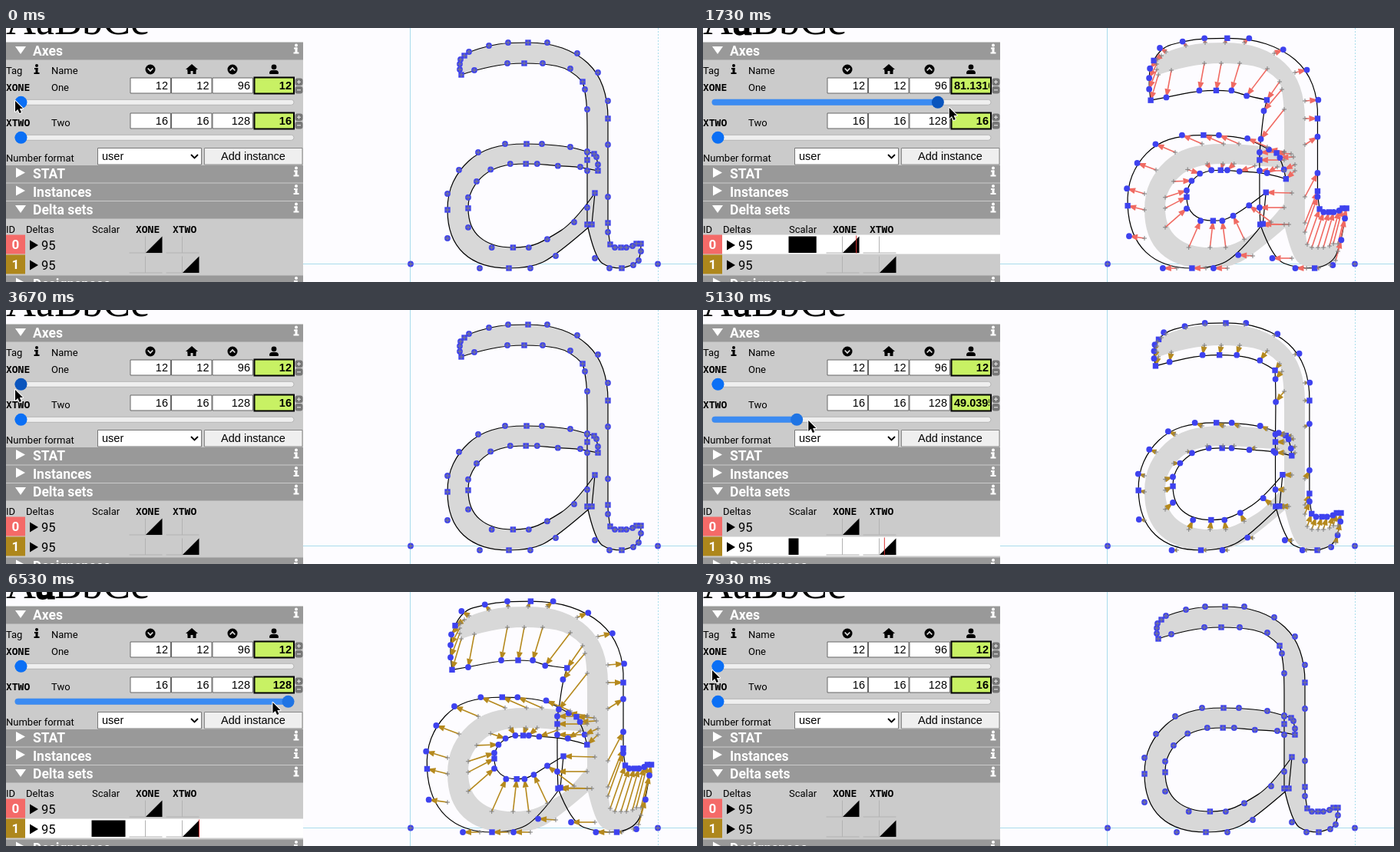
These frames come from a looping animation (900x331 px, 8 s). An HTML page with a canvas:

```html
<!DOCTYPE html>
<html lang="en">
<head>
<meta charset="utf-8">
<title>Variable font axes</title>
<style>
  html, body { margin: 0; height: 100%; overflow: hidden; background: #fdfcff; }
  canvas { display: block; }
</style>
</head>
<body>
<canvas id="stage" width="900" height="331"></canvas>
<script>
const ctx = document.getElementById('stage').getContext('2d');
const LOOP = 8000, STEP = 1000 / 15;
const SANS = 'Roboto, sans-serif', MONO = '"Noto Sans Mono", monospace', ARIAL = '"Liberation Sans", Arial, sans-serif';
const LABEL = `13px ${SANS}`, TAG = `bold 13px ${MONO}`, FIELD = `14.5px ${ARIAL}`, TITLE = '54px "Liberation Serif", serif';
const RED = '#f06a62', GOLD = '#b5891d', BLUE = '#3e42ef', LINE = '#b2b2b2', GUIDE = '#a9dcec';

// Motion: smooth ramps, and pulses that rise and fall back.
function ramp(t, from, to) {
  const u = Math.min(1, Math.max(0, (t - from) / (to - from)));
  return u * u * (3 - 2 * u);
}
const pulse = (t, rise, top, fall, end) => ramp(t, rise, top) - ramp(t, fall, end);

// Glyph: key points ("*" marks on-curve ones) and, per part, a rule for how the points move.
const withDelta = (p, rule) => {
  const [dx, dy] = rule(p.x, p.y);
  return { ...p, dx, dy };
};
const part = (keys, rule) => keys.split(' ').map(key => {
  const [x, y] = key.split(',').map(parseFloat);
  return withDelta({ x, y, on: key.endsWith('*') }, rule);
});

const stem = [
  part('593,61* 591,54 591,47 592,41 597,36*', (x, y) => [-12, 1.3 * (y - 30)]),
  part('603,31 629,23 654,19 680,19* 705,19 744,33 771,58 784,95', (x, y) => [.17 * (x - 660), .07 * (y - 118)]),
  part('784,118* 784,152 784,220 784,254*', (x, y) => [20, .37 * (118 - y)]),
  part('784,266 787,282* 793,286 801,286* 808,286 816,284 821,281* 827,281*', x => [20 - .15 * (x - 784), -56]),
  part('827,291 824,303 817,309 802,313* 786,313 767,300 757,256*',
    x => [.7 * (x - 757) - 38, Math.min(0, 6.5 * (819 - x))]),
  part('757,234 757,186 757,172* 757,162', () => [-39, 0]),
  part('757,106 754,80 751,70*', (x, y) => [2.8 * (757 - x) - 37, 47 - .5 * (106 - y)]),
  part('735,53 699,46 675,46* 653,46 610,55', x => [-8 - .55 * Math.max(0, x - 690), 43])
].flat();

// The counter is the outer bowl scaled down, walked backwards.
const counterRule = (x, y) => [34 - .5 * (x - 602), 10 - .48 * (y - 177)];
const outerBowl = part(
  '716,297 683,313 655,313* 617,313 575,274 575,237* 575,216 590,185 615,162 650,151 678,151* 698,151 735,155',
  (x, y) => [-22 - .06 * (313 - y), -.086 * (313 - y)]);
const counter = outerBowl.map(({ x, y, on }) =>
  withDelta({ x: 602 + .73 * (x - 575), y: 177 + .673 * (y - 151), on }, counterRule)).reverse();
const bowl = [
  part('767,215* 763,256*', () => [-41, -1]),
  outerBowl,
  part('757,161 766,164* 769,168 771,178 771,186* 748,181', (x, y) => [.4 * (y - 164) - 23, .65 * (y - 166)]),
  counter,
  part('740,253', counterRule)
].flat();
const contours = [stem, bowl], points = contours.flat();

function box(x, y, w, h, fill, stroke, width = 1, radius = 0) {
  ctx.beginPath();
  ctx.roundRect(x, y, w, h, radius);
  if (fill) { ctx.fillStyle = fill; ctx.fill(); }
  if (stroke) { ctx.strokeStyle = stroke; ctx.lineWidth = width; ctx.stroke(); }
}
function text(s, x, y, font, fill = '#000', align = 'left') {
  ctx.font = font;
  ctx.fillStyle = fill;
  ctx.textAlign = align;
  ctx.fillText(s, x, y);
}
function trace(xy) {
  ctx.beginPath();
  for (let i = 0; i < xy.length; i += 2) ctx.lineTo(xy[i], xy[i + 1]);
}
function poly(fill, ...xy) {
  trace(xy);
  ctx.fillStyle = fill;
  ctx.fill();
}
function line(color, width, ...xy) {
  trace(xy);
  ctx.strokeStyle = color;
  ctx.lineWidth = width;
  ctx.stroke();
}
function disc(x, y, r, fill) {
  ctx.beginPath();
  ctx.arc(x, y, r, 0, 7);
  ctx.fillStyle = fill;
  ctx.fill();
}

function info(x, y, fill) {
  disc(x, y - 5, 2, fill);
  box(x - 3, y - 2, 4.5, 2, fill);
  box(x - 1.5, y - 2, 3, 7, fill);
  box(x - 3.5, y + 4, 7, 2, fill);
}
function header(label, y, open) {
  box(0, y, 387, 22.5, '#999');
  if (open) poly('#fff', 12, y + 5, 26, y + 5, 19, y + 15);
  else poly('#fff', 13, y + 3, 25, y + 9.5, 13, y + 16);
  text(label, 35, y + 17, `600 17.5px ${SANS}`, '#fff');
  info(378, y + 8.5, '#fff');
}
function columnIcons() {
  for (const [x, s] of [[188, 1], [295, -1]]) {
    disc(x, 54, 6.5, '#000');
    line('#ddd', 1.8, x - 3.3, 54 - 1.5 * s, x, 54 + 2 * s, x + 3.3, 54 - 1.5 * s);
  }
  poly('#000', 234, 54, 242, 47, 250, 54);
  box(236.5, 53, 4, 7, '#000');
  box(243.5, 53, 4, 7, '#000');
  box(236.5, 53, 11, 3, '#000');
  disc(349, 50.8, 3.4, '#000');
  box(343, 55, 12, 5, '#000', null, 1, [4, 4, 1, 1]);
}

function axisRow(tag, name, y, min, max, v, thumb) {
  text(tag, 0, y + 17, TAG);
  text(name, 59, y + 17, LABEL);
  [min, min, max].forEach((n, i) => {
    const x = 162 + i * 53.5;
    box(x, y + .5, 52.5, 20, '#fff', '#666');
    text(n, x + 49, y + 15.5, FIELD, '#000', 'right');
  });
  box(323.5, y, 51.5, 21, '#c8f164', '#000', 2);
  ctx.save();
  ctx.beginPath();
  ctx.rect(326, y, 47, 21);
  ctx.clip();
  const value = String(+(min + v * (max - min)).toFixed(6));
  const long = value.length > 5;
  text(value, long ? 327 : 372, y + 15.5, `bold ${FIELD}`, '#000', long ? 'left' : 'right');
  ctx.restore();
  for (const dy of [1, 11.5]) {
    box(376.5, y + dy, 10, 9.5, '#777', null, 1, 3);
    line('#ddd', 1.2, 379, y + dy + 4.8, 384, y + dy + 4.8);
  }
  line('#ddd', 1.2, 381.5, y + 3.3, 381.5, y + 8.3);

  const x = 19.5 + v * 348, mid = y + 32.3;
  box(12, mid - 3.5, 363, 7, '#efefef', '#b5b5b5', 1, 4);
  box(11.5, mid - 4, x - 11.5, 8, '#3b8bf2', null, 1, 4);
  disc(x, mid, 8, thumb);
}

function deltaRow(id, color, v) {
  const y = 269.5 + id * 26;
  if (v > 0) box(25, y, 362, 25, '#fff');
  box(0, y, 25, 25, color);
  text(id, 12.5, y + 18.5, `bold 17px ${SANS}`, '#fff', 'center');
  poly('#000', 31, y + 7, 42, y + 13.5, 31, y + 20);
  text('95', 46, y + 19, `16.5px ${SANS}`);
  if (v > 0) box(111.5, y + 2, 44 * v, 21.5, '#000');
  [160.5, 208.5].forEach((x, axis) => {
    line(LINE, 1, x, y + 23.5, x + 43, y + 23.5);
    line(LINE, 1, x + 21, y + 2, x + 21, y + 23.5);
    if (axis !== id) return;
    poly('#000', x + 21.5, y + 23.5, x + 43, y + 2, x + 43, y + 23.5);
    const mark = x + 21.5 + 21.5 * v;
    if (v > 0) line('#d33', 1, mark, y + 1, mark, y + 24);
  });
}

function panel(t, one, two) {
  text('A', 0, 8, TITLE);
  text('a', 39, 8, TITLE);
  ctx.strokeStyle = '#000';
  ctx.lineWidth = 3 * (one + two);
  if (one + two > 0) ctx.strokeText('a', 39, 8);
  text('BbCc', 63, 8, TITLE);

  box(0, 18, 387, 313, '#cbcbcb');
  header('Axes', 19, true);
  text('Tag', 0, 60, LABEL);
  info(40, 54, '#000');
  text('Name', 59, 60, LABEL);
  columnIcons();
  axisRow('XONE', 'One', 64.5, 12, 96, one, t > 100 && t < 4000 ? '#0a55bd' : '#0a6ff5');
  axisRow('XTWO', 'Two', 110.5, 16, 128, two, two > 0 ? '#1f74e4' : '#0a6ff5');

  text('Number format', 0, 174, LABEL);
  box(119.5, 156.5, 135, 21.5, '#fff', '#777');
  text('user', 125, 172, FIELD);
  line('#000', 1.8, 241, 165, 245.5, 169.5, 250, 165);
  box(258.5, 156.5, 127.5, 21.5, '#efefef', '#888');
  text('Add instance', 322, 172, FIELD, '#000', 'center');

  header('STAT', 179, false);
  header('Instances', 202.5, false);
  header('Delta sets', 226, true);
  [['ID', 0], ['Deltas', 26], ['Scalar', 112]].forEach(([s, x]) => text(s, x, 267, LABEL));
  [['XONE', 169], ['XTWO', 217]].forEach(([s, x]) => text(s, x, 267, TAG));
  deltaRow(0, '#f46a68', one);
  deltaRow(1, '#ae871c', two);
  header('Designspace', 322.5, false);
}

const moved = (p, v) => ({ on: p.on, x: p.x + p.dx * v, y: p.y + p.dy * v });

// Quadratic outline; neighbouring controls imply a point halfway between them.
function outline(v) {
  ctx.beginPath();
  for (const contour of contours) {
    const pts = contour.map(p => moved(p, v));
    ctx.moveTo(pts[0].x, pts[0].y);
    pts.forEach((p, i) => {
      const next = pts[(i + 1) % pts.length];
      if (p.on) { if (next.on) ctx.lineTo(next.x, next.y); }
      else if (next.on) ctx.quadraticCurveTo(p.x, p.y, next.x, next.y);
      else ctx.quadraticCurveTo(p.x, p.y, (p.x + next.x) / 2, (p.y + next.y) / 2);
    });
    ctx.closePath();
  }
}
function cross(x, y) {
  line('#808080', 1, x - 3, y, x + 3, y);
  line('#808080', 1, x, y - 3, x, y + 3);
}
function arrow(p, v, color) {
  const { x, y } = moved(p, v);
  const length = Math.hypot(p.dx, p.dy) * v;
  if (length < .5) return;
  const ux = (x - p.x) / length, uy = (y - p.y) / length;
  const head = Math.min(11, length), half = head * .36;
  const bx = x - ux * head, by = y - uy * head;
  line(color, 1.6, p.x, p.y, bx, by);
  poly(color, x, y, bx - uy * half, by + ux * half, bx + uy * half, by - ux * half);
}
function glyph(one, two) {
  const v = one + two;
  line(GUIDE, 1, 387, 307.5, 900, 307.5);
  line(GUIDE, 1, 526.5, 0, 526.5, 331);
  ctx.setLineDash([2, 2]);
  line(GUIDE, 1, 849.5, 0, 849.5, 331);
  ctx.setLineDash([]);

  outline(0);
  ctx.fillStyle = '#d8d8d8';
  ctx.fill();
  outline(v);
  ctx.strokeStyle = '#000';
  ctx.lineWidth = 1.2;
  ctx.stroke();

  for (const p of points) arrow(p, v, one > 0 ? RED : GOLD);
  for (const p of points) {
    const { x, y } = moved(p, v);
    if (p.on) box(x - 3.7, y - 3.7, 7.4, 7.4, BLUE);
    else disc(x, y, 3.9, BLUE);
  }
  for (const p of points) cross(p.x, p.y);
  for (const x of [527, 849]) {
    disc(x, 307.5, 3.9, BLUE);
    cross(x, 307.5);
  }
}

function cursor(x, y) {
  ctx.save();
  ctx.translate(x, y);
  trace([0, 0, 0, 14, 3.3, 11, 5.6, 16, 8, 15, 5.8, 10, 10, 10]);
  ctx.closePath();
  ctx.lineJoin = 'round';
  ctx.strokeStyle = '#fff';
  ctx.lineWidth = 2;
  ctx.stroke();
  ctx.fillStyle = '#000';
  ctx.fill();
  ctx.restore();
}

function draw(now) {
  // Held at 15 pictures a second; the small lead absorbs timer rounding.
  const t = Math.floor(((now + 4) % LOOP) / STEP) * STEP;
  const one = pulse(t, 753.3, 2092.2, 2810, 3620);
  const two = pulse(t, 4553.3, 6166.1, 6540, 7350);
  box(0, 0, 900, 331, '#fdfcff');
  panel(t, one, two);
  glyph(one, two);
  // The pointer runs slightly ahead of the thumb it drags.
  const reach = pulse(t, 690, 2030, 2620, 3550) + pulse(t, 4480, 6105, 6420, 7260);
  const drop = 9 * ramp(t, 690, 1730) + 40 * ramp(t, 3670, 4350) - 42 * ramp(t, 7300, 7850);
  cursor(12 + 353 * reach, 95 + drop);
}

const start = performance.now();
function tick() {
  draw(performance.now() - start);
  requestAnimationFrame(tick);
}
tick();
</script>
</body>
</html>
```
